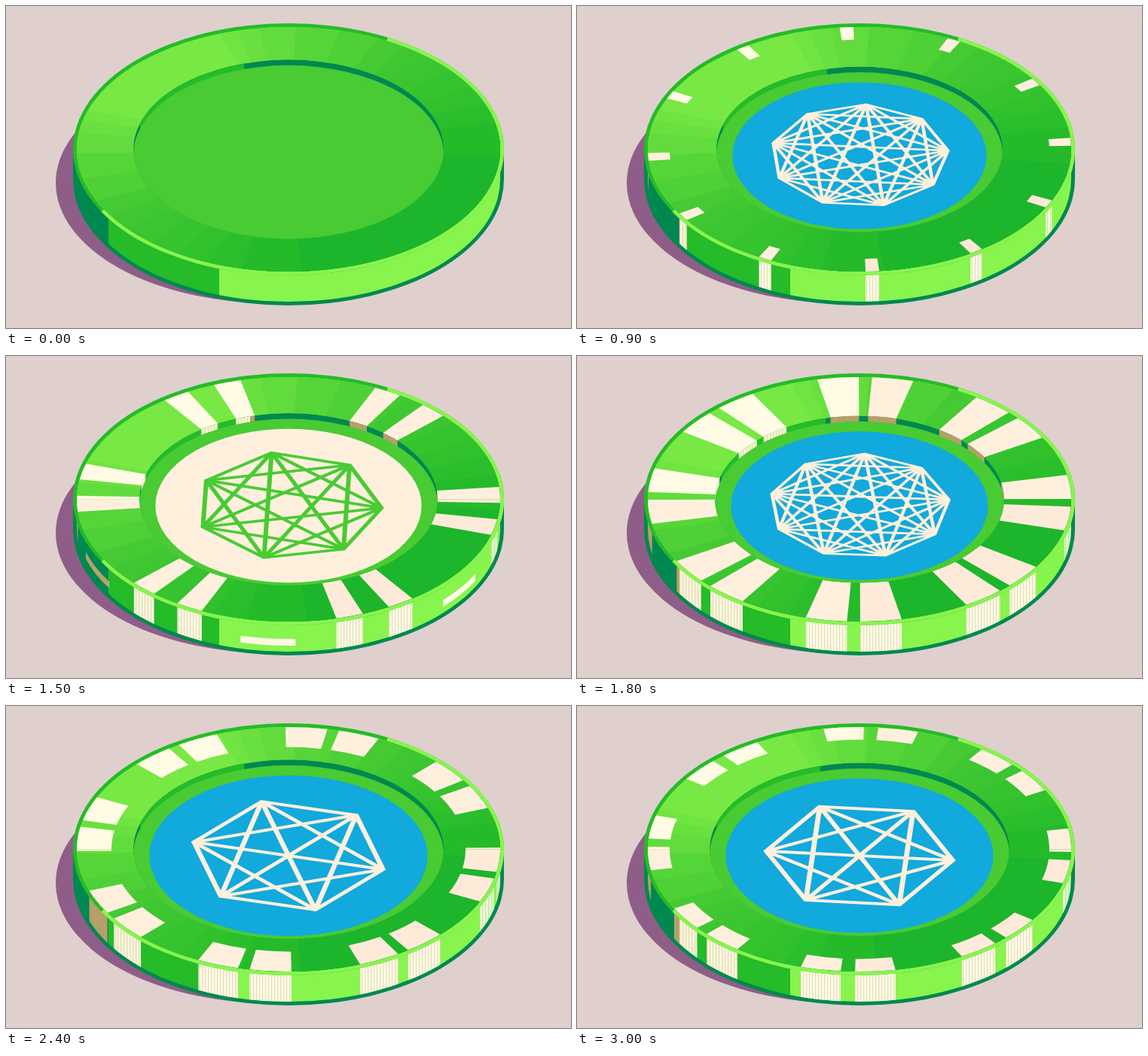
Write an HTML page that moves like this. It is 750 px wide and 428 px high and loops after 3300 ms.

```html
<!DOCTYPE html>
<html lang="en">
<head>
<meta charset="utf-8">
<title>Poker chip</title>
<style>
html, body { margin: 0; width: 100%; height: 100%; overflow: hidden; background: #dfd0cd; }
svg { display: block; width: 750px; height: 428px; }
</style>
</head>
<body>
<svg viewBox="0 0 750 428" xmlns="http://www.w3.org/2000/svg">
  <defs>
    <clipPath id="side"><path d="M94 190.5V230.5A281 162.5 0 0 0 656 230.5V190.5Z"/></clipPath>
    <linearGradient id="sideCream" gradientUnits="userSpaceOnUse" x1="0" y1="0" x2="750" y2="0">
      <stop offset=".1813" stop-color="#b9a16c"/>
      <stop offset=".1813" stop-color="#fbf4d9"/>
      <stop offset=".38" stop-color="#fffae4"/>
      <stop offset=".82" stop-color="#fffae4"/>
      <stop offset=".87" stop-color="#dcf9c6"/>
    </linearGradient>
    <pattern id="hatch" patternUnits="userSpaceOnUse" width="4" height="8">
      <rect width="1.2" height="8" fill="#8c8a4a" opacity=".25"/>
    </pattern>
  </defs>
  <rect width="750" height="428" fill="#dfd0cd"/>
  <ellipse cx="352" cy="235" rx="286" ry="160" fill="#8f5e88"/>
  <path d="M89 190.5V230.5A286 167.5 0 0 0 661 230.5V190.5Z" fill="#008850"/>
  <g clip-path="url(#side)">
    <rect x="136" y="190" width="147" height="210" fill="#25bb29"/>
    <rect x="283" y="190" width="380" height="210" fill="#88f44e"/>
    <g id="wall"></g>
  </g>
  <ellipse cx="375" cy="190.5" rx="286" ry="167.5" fill="#25bb29"/>
  <path id="rim" fill="none" stroke="#88f44e" stroke-width="5"/>
  <g id="ring" transform="translate(375 190.5) scale(1 .5783)"></g>
  <g id="well"></g>
</svg>
<script>
const CX = 375, CY = 190.5, R = 281, TILT = 0.5783, STEP = 300;
const CREAM = '#fef0dd', GREEN = '#48cb33', BLUE = '#12a9dc';
const $ = id => document.getElementById(id);
const cos = a => Math.cos(a * Math.PI / 180);
const sin = a => Math.sin(a * Math.PI / 180);
const pt = (r, a) => `${(r * cos(a)).toFixed(2)} ${(r * sin(a)).toFixed(2)}`;

// hole: well radius; n groups of stripes from angle a, each w wide, with a
// second one after a gap; cut: inner radius of stripes; k-gon turned by rot
const plain = { hole: 206, n: 0 };
const chip = (hole, n, a, w, gap, cut, k, rot, more) =>
  ({ hole, n, a, w, gap, cut, k, rot, ...more });
const scenes = [
  plain,
  chip(183.5, 1, 129.3, 89.9, 0, 0, 7, 180),
  chip(192, 1, 84.3, 179.9, 0, 0, 8, 180),
  chip(190, 12, 264.65, 3.7, 0, 252, 9, 274.3),
  chip(195, 6, 234.2, 7.5, 7.7, 240, 8, 0),
  chip(198, 6, 234.2, 7.5, 7.7, 0, 7, 2.4, { disc: CREAM, line: GREEN, bars: true }),
  chip(192, 8, 258.5, 11.3, 3.6, 0, 9, 273.3),
  chip(199, 8, 264, 11.3, 3.4, 235, 9, 280),
  chip(206, 8, 269.2, 11.4, 3.2, 235, 6, 14),
  chip(203, 8, 265, 11.2, 3.5, 244, 6, 9),
  chip(199, 8, 260.2, 11, 3.9, 252, 6, 4.9)
];

// half-angle of each shade around the darkest direction
const shades = [
  [154, '#70e441'], [149, '#69e03f'], [143, '#62dc3d'], [133, '#56d538'],
  [121, '#4ed136'], [110, '#45ca33'], [102, '#3fc732'], [94, '#3ac531'],
  [85, '#35c32f'], [76, '#30c12d'], [67, '#2bbe2c'], [58, '#24ba2a'], [41.5, '#1db52b']
];
const zones = [[0, '#fdead8'], [90, CREAM], [180, '#fffbe4'], [270, CREAM]];

function sector(r0, r1, a, b, fill) {
  const big = b - a > 180 ? 1 : 0;
  const back = r0 ? `L${pt(r0, b)}A${r0} ${r0} 0 ${big} 0 ${pt(r0, a)}` : 'L0 0';
  return `<path d="M${pt(r1, a)}A${r1} ${r1} 0 ${big} 1 ${pt(r1, b)}${back}Z" fill="${fill}"/>`;
}

// parts of the stripes lying between angles lo and hi
function within(list, lo, hi) {
  const out = [];
  for (const [a, b] of list)
    for (const t of [-360, 0, 360]) {
      const p = Math.max(a + t, lo), q = Math.min(b + t, hi);
      if (q - p > 0.01) out.push([p, q]);
    }
  return out;
}

function stripes(s) {
  const out = [];
  for (let i = 0; i < s.n; i++) {
    const a = (s.a + i * 360 / s.n) % 360;
    out.push([a, a + s.w]);
    if (s.gap) out.push([a + s.w + s.gap, a + 2 * s.w + s.gap]);
  }
  return out;
}

const column = (x0, x1, y, h, fill) =>
  `<rect x="${x0}" y="${y}" width="${Math.max(0, x1 - x0)}" height="${h}" fill="${fill}"/>`;

function wall(s, list) {
  let out = '';
  for (const [a, b] of within(list, 0, 180))
    for (const fill of ['url(#sideCream)', 'url(#hatch)'])
      out += column(CX + R * cos(b), CX + R * cos(a), 190, 210, fill);
  if (!s.bars) return out;
  for (const m of [35.6, 95.6, 155.6]) {
    const edge = (a, dy) => `${CX + R * cos(a)} ${CY + 162.5 * sin(a) + dy}`;
    const arc = `A${R} 162.5 0 0`;
    const d = `M${edge(m - 7.5, 23)}${arc} 1 ${edge(m + 7.5, 23)}` +
      `L${edge(m + 7.5, 32)}${arc} 0 ${edge(m - 7.5, 32)}Z`;
    out += `<path d="${d}" fill="url(#sideCream)"/>`;
  }
  return out;
}

function ring(s, list) {
  let out = `<circle r="${R}" fill="#78e844"/>`;
  for (const [d, fill] of shades) {
    const h = d - (206 - s.hole) * 0.28 * (1 - d / 155);
    out += sector(0, R, 45 - h, 45 + h, fill);
  }
  for (const [z, fill] of zones)
    for (const [a, b] of within(list, z, z + 90)) out += sector(s.cut, R, a, b, fill);
  return out;
}

function emblem(s, r) {
  const v = Array.from({ length: s.k }, (_, i) => pt(r, s.rot + i * 360 / s.k));
  let d = `M${v.join('L')}Z`;
  for (let i = 0; i < s.k; i++)
    for (let j = i + 2; j < s.k; j++)
      if (i || j < s.k - 1) d += `M${v[i]}L${v[j]}`;
  const width = s.k < 7 ? 6.8 : s.k < 8 ? 6 : s.k < 9 ? 5.2 : 4.6;
  return `<path d="${d}" fill="none" stroke="${s.line || CREAM}" stroke-width="${width}"/>`;
}

function well(s, list) {
  const r = s.hole, left = CX - r, turn = 522 - r;
  const oval = (rad, dy, fill) =>
    `<ellipse cx="${CX}" cy="${CY + dy}" rx="${rad}" ry="${rad * TILT}" fill="${fill}"/>`;
  let out = `<clipPath id="mouth">${oval(r, 0, '#000')}</clipPath><g clip-path="url(#mouth)">` +
    oval(r, 0, '#008850') + column(left + 9, turn, 60, 110, '#25bb29');
  if (!s.cut)
    for (const [a, b] of within(list, 180, 360)) {
      const x0 = CX + r * cos(a), x1 = CX + r * cos(b);
      out += column(x0, Math.min(x1, turn), 60, 131, '#f8f5d6') +
        column(Math.max(x0, turn), x1, 60, 131, '#b9a16c') +
        column(x0, x1, 60, 131, 'url(#hatch)');
    }
  out += oval(r, 7.5, GREEN) + '</g>';
  if (!s.k) return out;
  const disc = r - 21.3;
  return out + oval(disc, 8.5, s.disc || BLUE) +
    `<g transform="translate(${CX} ${CY + 8.5}) scale(1 ${TILT})">${emblem(s, disc * 0.7)}</g>`;
}

const rimPoint = a => `${CX + 283.5 * cos(a)} ${CY + 165 * sin(a)}`;
$('rim').setAttribute('d', `M${rimPoint(-62.5)}A283.5 165 0 1 1 ${rimPoint(150.5)}`);

let shown = -1;
function draw(time) {
  const i = Math.floor(time / STEP) % scenes.length;
  if (i === shown) return;
  shown = i;
  const s = scenes[i], list = stripes(s);
  $('wall').innerHTML = wall(s, list);
  $('ring').innerHTML = ring(s, list);
  $('well').innerHTML = well(s, list);
}

const start = performance.now();
function tick() {
  draw(performance.now() - start);
  requestAnimationFrame(tick);
}
tick();
</script>
</body>
</html>
```
